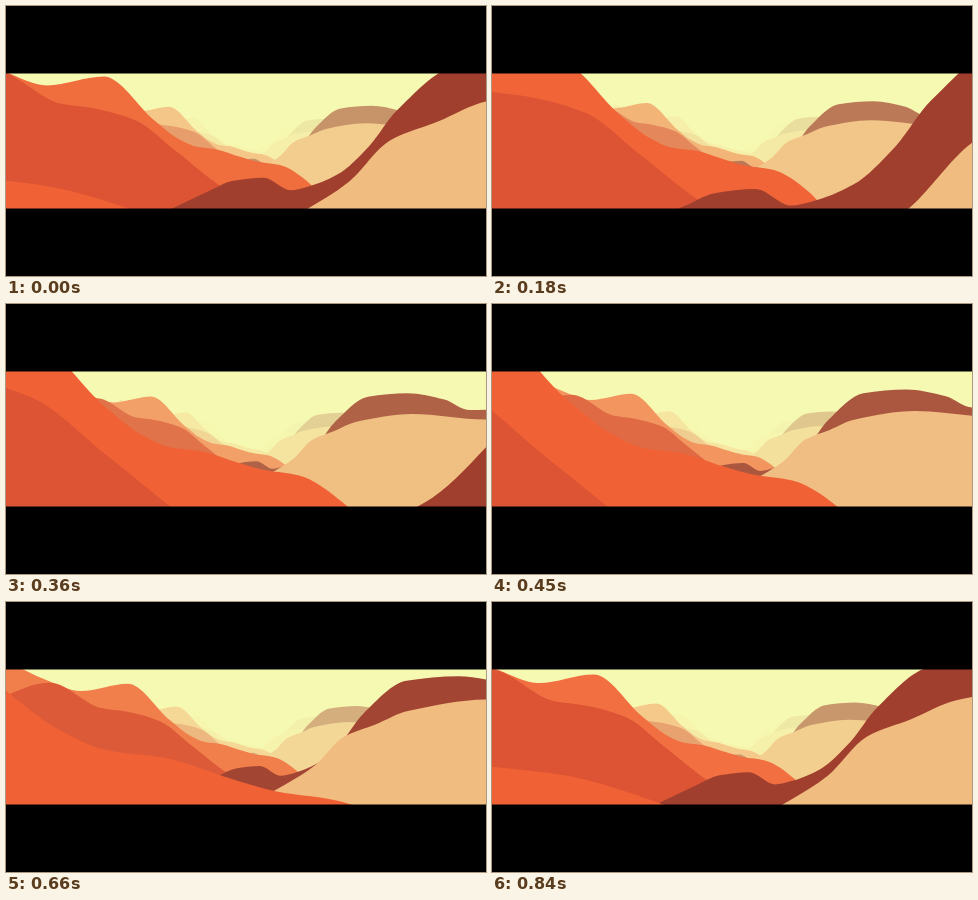
Recreate the animation shown at these times as an HTML page. Size 480 by 270 pixels, loop 870 ms.

```html
<!DOCTYPE html>
<html lang="en">
<head>
<meta charset="utf-8">
<title>Valley flight</title>
<style>
html, body { margin: 0; width: 100%; height: 100%; overflow: hidden; background: #000; }
svg { display: block; width: 100vw; height: 100vh; }
</style>
</head>
<body>
<svg viewBox="0 0 480 270">
  <rect y="60" width="480" height="150" fill="#f6f9b1"/>
  <g id="view"></g>
  <rect width="480" height="67.5"/>
  <rect y="202.5" width="480" height="67.5"/>
</svg>
<script>
const LOOP = 870, STEP = 30, GENS = 6;
const VX = 240, VY = 136.6;
const SKY = [246, 249, 177];

// Ridges of one generation, back to front. keys: crests, dips and knees,
// measured from the vanishing point at unit distance.
// near: extra distance to the camera; clear: depth before haze sets in.
const ridges = [
  { color: [220, 84, 52], near: 0.85, clear: 0, keys: [
    [-290, -35], [-214, -61], [-157, -33], [-131, -29.5], [-94, -19], [-60, 7],
    [-20, 38], [20, 60]] },
  { color: [160, 63, 46], near: 0.85, clear: 0, keys: [
    [-75, 62], [-31, 41], [-11, 32.5], [15, 29.8], [38, 40.5], [51, 38], [78, 27],
    [105, 2.6], [128, -27], [175, -63], [232, -68], [285, -59], [320, -44], [400, -46]] },
  { color: [240, 188, 128], near: 0.5, clear: 0.25, keys: [
    [0, 50], [31, 33], [51, 20], [72, -1], [96, -10.5], [120, -20.5], [180, -29],
    [260, -23], [400, -30]] },
  { color: [240, 98, 53], near: 0.18, clear: 0.65, keys: [
    [-350, -115], [-283, -83], [-235, -67.5], [-168, -78], [-108, -26], [-80, -4.5],
    [-58, 5], [-35, 8], [-6, 17], [13, 22.3], [40, 26.5], [76, 49], [110, 95]] }
];

// Smooth curve that never overshoots its keys, closed far below.
function outline(keys) {
  const last = keys.length - 1;
  const rise = i => (keys[i + 1][1] - keys[i][1]) / (keys[i + 1][0] - keys[i][0]);
  const slope = i => {
    if (i === 0) return rise(0);
    if (i === last) return rise(last - 1);
    const a = rise(i - 1), b = rise(i);
    return a * b > 0 ? 2 * a * b / (a + b) : 0;
  };
  let d = `M${keys[0][0]} 600L${keys[0]}`;
  for (let i = 0; i < last; i++) {
    const [x0, y0] = keys[i], [x1, y1] = keys[i + 1];
    const w = (x1 - x0) / 3;
    d += `C${x0 + w} ${y0 + w * slope(i)} ${x1 - w} ${y1 - w * slope(i + 1)} ${x1} ${y1}`;
  }
  return d + "V600Z";
}

const view = document.getElementById("view");
const layers = [];
for (let gen = GENS - 1; gen >= 0; gen--) {
  for (const ridge of ridges) {
    const el = document.createElementNS("http://www.w3.org/2000/svg", "path");
    el.setAttribute("d", outline(ridge.keys));
    view.appendChild(el);
    layers.push({ el, gen, ridge });
  }
}

function haze(color, depth) {
  const d = Math.max(0, depth);
  const f = 1 - Math.exp(-0.6 * d * d);
  return `rgb(${color.map((v, i) => Math.round(v + (SKY[i] - v) * f))})`;
}

function draw(ms) {
  const t = Math.floor((ms % LOOP) / STEP) * STEP / LOOP;
  for (const { el, gen, ridge } of layers) {
    const depth = gen - t;
    const dist = depth + ridge.near;
    if (dist < 0.03) {
      el.setAttribute("display", "none");
      continue;
    }
    el.removeAttribute("display");
    el.setAttribute("transform", `translate(${VX} ${VY}) scale(${1 / dist})`);
    el.setAttribute("fill", haze(ridge.color, depth - ridge.clear));
  }
}

const start = performance.now();
function tick() {
  draw(performance.now() - start);
  requestAnimationFrame(tick);
}
tick();
</script>
</body>
</html>
```
